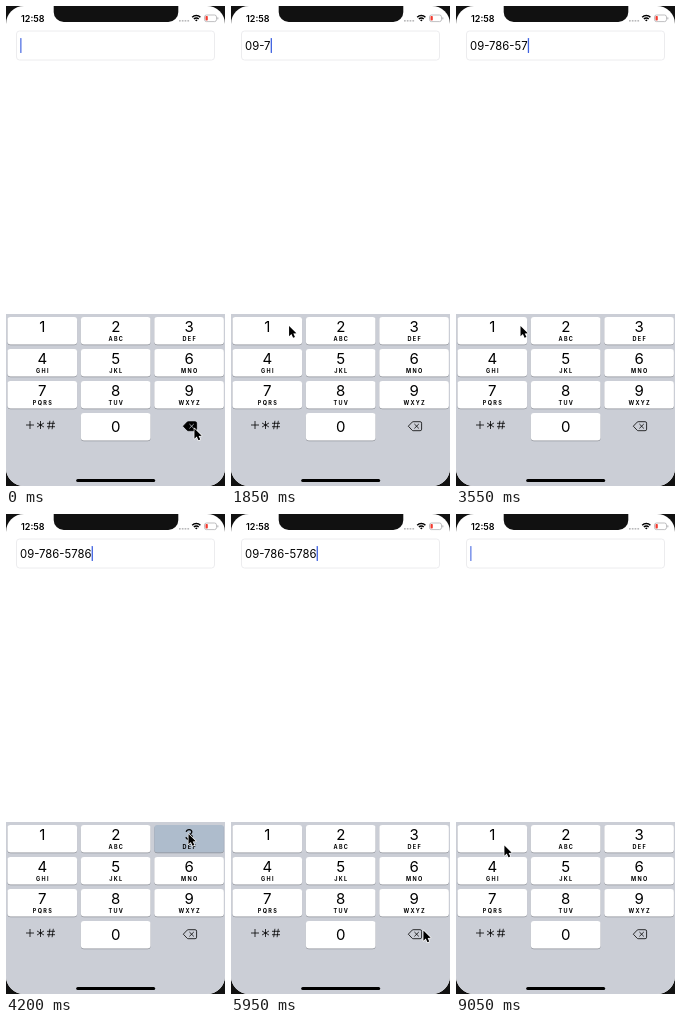
Recreate the animation shown at these times as an HTML page with a canvas. Size 219 px wide and 480 px high, loop 9100 ms.

```html
<!DOCTYPE html>
<html lang="en">
<head>
<meta charset="utf-8">
<title>Phone number field</title>
<style>
html, body { margin: 0; width: 100%; height: 100%; overflow: hidden; background: #111; }
canvas { display: block; width: 219px; height: 480px; }
</style>
</head>
<body>
<canvas id="stage"></canvas>
<script>
const W = 219, H = 480, LOOP = 9100, STEP = 50;
const FONT = 'Inter, "Liberation Sans", sans-serif';
const canvas = document.getElementById('stage');
const ctx = canvas.getContext('2d');
const scale = Math.max(1, window.devicePixelRatio || 1);
canvas.width = W * scale;
canvas.height = H * scale;

const NUMBER = '0978657865';
const LETTERS = ['', 'ABC', 'DEF', 'GHI', 'JKL', 'MNO', 'PQRS', 'TUV', 'WXYZ'];
const KEY_W = 69.6, KEY_H = 27.5;
const HOLD = 100, TYPE_LAG = 50, DWELL = 130, TAP = 60;

function keyPos(k) {
  const i = k === 0 ? 10 : k - 1;
  return { x: 1.5 + 73.4 * (i % 3), y: 311 + 32 * Math.floor(i / 3) };
}

// Each press follows the last after a pause that grows with the distance moved.
let time = 770, prev = null;
const presses = [...'0212341234'].map(Number).map(key => {
  const p = keyPos(key);
  if (prev) time += 322 + 1.2 * Math.hypot(p.x - prev.x, p.y - prev.y);
  prev = p;
  return { key, time, x: p.x + KEY_W / 2 - 1, y: p.y + 8.5 };
});

// Two slow deletions, then a steady run
const erases = [5750, 6700];
for (let i = 0; i < 8; i++) erases.push(7240 + 168 * i);

// Pointer moves: leave at `from`, rest at (x, y) by `to`
const moves = [{ from: 0, to: 0, x: 188, y: 422 }];
presses.forEach((p, i) =>
  moves.push({ from: i ? presses[i - 1].time + DWELL : 100, to: p.time, x: p.x, y: p.y }));
moves.push({ from: 4800, to: 5100, x: 210, y: 427 },
  { from: 5250, to: 5700, x: 192, y: 416 },
  { from: 8600, to: 9050, x: 48, y: 331 });

function pointerAt(t) {
  let { x, y } = moves[0];
  for (const m of moves) {
    if (t < m.from) break;
    const u = Math.min(1, (t - m.from) / (m.to - m.from || 1));
    const e = u * u * (3 - 2 * u);
    x += (m.x - x) * e;
    y += (m.y - y) * e;
  }
  return [x, y];
}

function formatNumber(n) {
  const d = NUMBER.slice(0, n);
  const mid = n < 10 ? 5 : 6;
  return [d.slice(0, 2), d.slice(2, mid), d.slice(mid)].filter(Boolean).join('-');
}

function stateAt(t) {
  const typed = presses.map(p => p.time + TYPE_LAG).filter(x => x <= t);
  const erased = erases.filter(x => x <= t);
  const pressed = presses.find(p => t >= p.time && t < p.time + HOLD);
  return {
    text: formatNumber(typed.length - erased.length),
    lastEdit: Math.max(-600, ...typed, ...erased),
    key: pressed ? pressed.key : -1,
    erasing: t < 100 || erases.some(e => t >= e && t < e + TAP)
  };
}

// Solid after an edit, then fades out and back in
function caretAlpha(age) {
  const p = age % 1000;
  if (p < 500) return 1;
  if (p < 800) return 1 - ((p - 500) / 300) ** 2;
  return (p - 800) / 200;
}

function box(x, y, w, h, r, fill) {
  ctx.beginPath();
  ctx.roundRect(x, y, w, h, r);
  if (fill) {
    ctx.fillStyle = fill;
    ctx.fill();
  }
}

function line(x1, y1, x2, y2, color = '#000') {
  ctx.beginPath();
  ctx.moveTo(x1, y1);
  ctx.lineTo(x2, y2);
  ctx.lineWidth = 0.8;
  ctx.strokeStyle = color;
  ctx.stroke();
}

function label(str, x, y, size, weight = 400, align = 'center', spacing = 0) {
  ctx.font = `${weight} ${size}px ${FONT}`;
  ctx.textAlign = align;
  ctx.letterSpacing = spacing + 'px';
  ctx.fillStyle = '#000';
  ctx.fillText(str, x + spacing / 2, y);
  ctx.letterSpacing = '0px';
}

function drawStatusBar() {
  box(47.7, -10, 124.6, 26, 10, '#111');
  label('12:58', 15, 15.6, 9, 600, 'left');

  ctx.fillStyle = '#b9b9bb';
  for (let i = 0; i < 4; i++) ctx.fillRect(173 + i * 2.8, 14, 1.7, 1.6);

  // Wi-Fi
  ctx.strokeStyle = ctx.fillStyle = '#000';
  ctx.lineWidth = 1.5;
  for (const r of [1, 3.4, 5.8]) {
    ctx.beginPath();
    ctx.arc(190.3, 15.4, r, -Math.PI * 0.75, -Math.PI * 0.25);
    ctx.stroke();
  }

  // Battery
  box(198.5, 9, 12, 6.6, 2);
  ctx.lineWidth = 0.7;
  ctx.strokeStyle = '#a5a5a8';
  ctx.stroke();
  box(199.5, 10, 2.3, 4.6, 0.8, '#f23b30');
  box(211.4, 11.2, 0.9, 2.3, 0.4, '#a5a5a8');
}

function drawField(s, t) {
  box(10.5, 25, 198, 29, 3);
  ctx.lineWidth = 0.8;
  ctx.strokeStyle = '#e8e8ea';
  ctx.stroke();
  label(s.text, 14, 44, 11.3, 400, 'left');
  const x = 14.2 + ctx.measureText(s.text).width;
  ctx.globalAlpha = caretAlpha(t - s.lastEdit);
  box(x, 32, 1.3, 15, 0.6, '#3f62e0');
  ctx.globalAlpha = 1;
}

function drawKey(k, lit) {
  const { x, y } = keyPos(k), cx = x + KEY_W / 2;
  box(x, y + 0.8, KEY_W, KEY_H, 3, '#8d9097');
  box(x, y, KEY_W, KEY_H, 3, lit ? '#aebccc' : '#fff');
  label(String(k), cx, y + (k ? 15.2 : 18.7), 15);
  if (k) label(LETTERS[k - 1], cx, y + 23.8, 5.5, 700, 'center', 1.3);
}

function drawSymbols() {
  const y = 419;
  line(20, y, 28, y);
  line(24, y - 4, 24, y + 4);
  for (let i = 0; i < 3; i++) {
    const a = Math.PI * (1 / 2 + i / 3), dx = 4 * Math.cos(a), dy = 4 * Math.sin(a);
    line(34.5 - dx, y - dy, 34.5 + dx, y + dy);
  }
  for (const d of [-1.7, 1.7]) {
    line(45.6 + d, y - 4.2, 44.4 + d, y + 4.2);
    line(41, y + d, 49, y + d);
  }
}

function drawBackspace(filled) {
  const top = 415.7, mid = 420.2, bottom = 424.7, right = 190.6;
  ctx.beginPath();
  ctx.moveTo(177.3, mid);
  ctx.arcTo(181.6, top, right, top, 1.2);
  ctx.arcTo(right, top, right, bottom, 1.5);
  ctx.arcTo(right, bottom, 181.6, bottom, 1.5);
  ctx.arcTo(181.6, bottom, 177.3, mid, 1.2);
  ctx.closePath();
  ctx.lineJoin = 'round';
  ctx.lineWidth = 0.8;
  ctx.strokeStyle = ctx.fillStyle = '#000';
  if (filled) ctx.fill();
  ctx.stroke();
  for (const d of [-2.2, 2.2])
    line(185.6 - d, mid - 2.2, 185.6 + d, mid + 2.2, filled ? '#cbced6' : '#000');
}

function drawKeyboard(s) {
  ctx.fillStyle = '#cbced6';
  ctx.fillRect(0, 308, W, H - 308);
  for (let k = 0; k < 10; k++) drawKey(k, s.key === k);
  drawSymbols();
  drawBackspace(s.erasing);
  box(70.2, 473, 79, 3, 1.5, '#000');
}

function drawPointer(x, y) {
  ctx.save();
  ctx.translate(x + 0.4, y + 0.4);
  ctx.scale(0.88, 0.88);
  const arrow = new Path2D('M0 0V11.8L2.7 9.3L4.6 13.6L6.7 12.7L4.8 8.5L8.3 8.3Z');
  ctx.lineJoin = 'round';
  ctx.lineWidth = 1.5;
  ctx.strokeStyle = '#fff';
  ctx.stroke(arrow);
  ctx.fillStyle = '#000';
  ctx.fill(arrow);
  ctx.restore();
}

function draw(t) {
  const s = stateAt(t);
  ctx.setTransform(scale, 0, 0, scale, 0, 0);
  ctx.fillStyle = '#111';
  ctx.fillRect(0, 0, W, H);
  ctx.save();
  box(0, 0, W, H, 18, '#fff');
  ctx.clip();
  drawField(s, t);
  drawKeyboard(s);
  drawStatusBar();
  ctx.restore();
  drawPointer(...pointerAt(t));
}

let start = null;
function tick(now) {
  if (start === null) start = now;
  const t = (now - start) % LOOP;
  draw(Math.floor(t / STEP) * STEP);
  requestAnimationFrame(tick);
}
draw(0);
requestAnimationFrame(tick);
</script>
</body>
</html>
```
